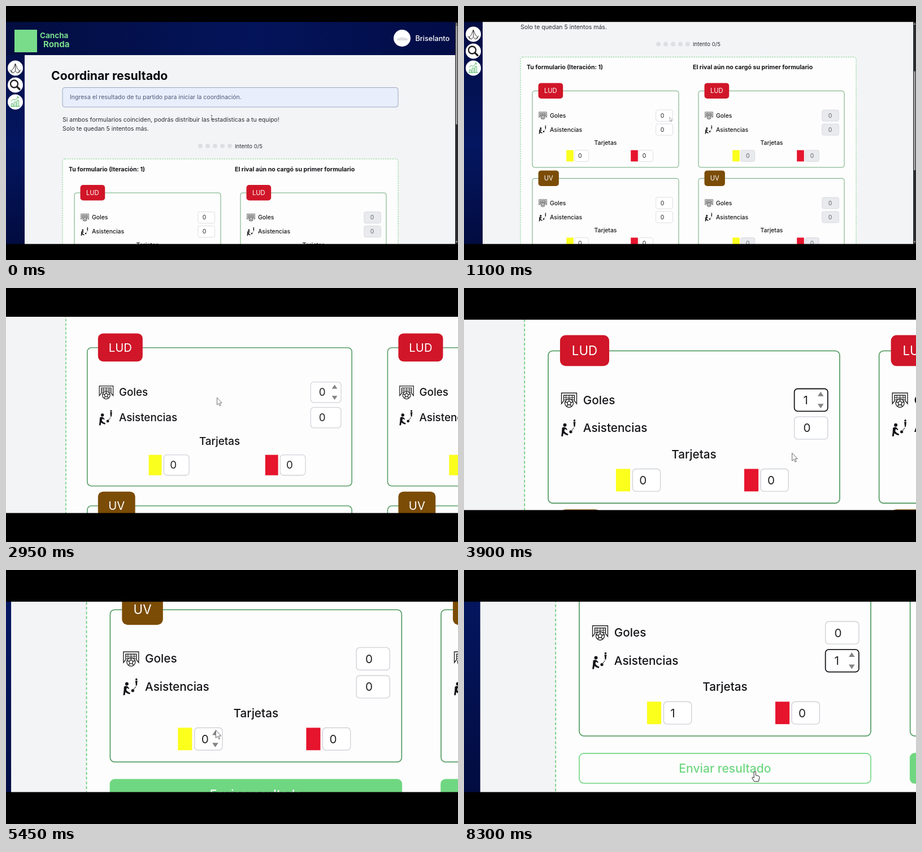
Animation of 800 by 450 pixels, one loop 8.35 s. Source, as an HTML page:

```html
<!DOCTYPE html>
<html lang="es">
<head>
<meta charset="utf-8">
<title>Coordinar resultado</title>
<style>
html, body { margin: 0; width: 100%; height: 100%; overflow: hidden; background: #000; }
svg { display: block; width: 100%; height: 100%; font: 500 10.4px Inter, sans-serif; fill: #141418; }
.bold { font-weight: 700; }
.plain { font-weight: 400; fill: #2b2d33; }
.mid { text-anchor: middle; }
.line { fill: none; stroke: #222; }
</style>
</head>
<body>
<svg viewBox="0 0 800 450">
  <defs>
    <linearGradient id="head">
      <stop offset="0" stop-color="#020d40"/><stop offset=".55" stop-color="#04145a"/><stop offset="1" stop-color="#020c46"/>
    </linearGradient>
    <linearGradient id="side" x2="0" y2="1">
      <stop offset="0" stop-color="#020d42"/><stop offset=".55" stop-color="#041660"/><stop offset="1" stop-color="#020c40"/>
    </linearGradient>
    <g id="goal" class="line" stroke-width="1.4">
      <path d="M1 20V1H28V20L24 15V5H5V15Z"/>
      <path d="M5 9H24M5 13H24M9 5V15M14.5 5V11M20 5V15" stroke-width="1"/>
      <circle cx="14.5" cy="19" r="7.5" fill="#fdfdfd"/>
      <path d="M14.5 15L18 18 16.7 22H12.3L11 18ZM14.5 15V11.5M18 18L21.5 16.5M16.7 22L19 25M12.3 22L10 25M11 18L7.5 16.5"/>
    </g>
    <g id="assist">
      <circle cx="7" cy="10" r="3"/><circle cx="17.5" cy="22" r="2.6"/><circle cx="24" cy="2" r="1.8"/>
      <path d="M2 15L5 13.5 8.500 14.500 11.500 18 10.500 19 7 17 6 21 9 24 13 26 12 28.500 7 26.500 4.500 24.500 3.500 30H.5L1.500 23Z"/>
      <path d="M22 4.500H26L25.500 8 25 13H23L22.500 8Z"/>
      <path class="line" d="M19.500 19.500L23.500 14" stroke-width="1.3" stroke-dasharray="2 1"/>
    </g>
  </defs>
  <g id="cam">
    <rect y="28" width="800" height="394" fill="#f3f4f6"/>
    <rect y="28" width="33" height="394" fill="url(#side)"/>
    <g id="page"></g>
    <g id="menu">
      <circle cx="16.500" cy="110" r="13.500" fill="#fff"/>
      <circle cx="16.500" cy="140" r="13.500" fill="#fff"/>
      <circle cx="16.500" cy="170" r="13.500" fill="#fff"/>
      <path class="line" stroke-width=".9" d="M16.500 102L13 111 9 115 13 119 16.500 115 20 119 24 115 20 111ZM16.500 102V115M7 113L11 119M26 113L22 119"/>
      <g class="line" stroke="#111"><circle cx="14.500" cy="138" r="6.500" stroke-width="2.300"/><path d="M19.500 143L25 148.500" stroke-width="3.200"/></g>
      <path fill="none" stroke="#55b56a" d="M8 178H25M9.500 178V173H12.500V178M14.500 178V170H17.500V178M19.500 178V167H22.500V178M9 169L13 165 16 167 22 161M19 161H22V164"/>
    </g>
    <rect x="795" y="28" width="5" height="394" fill="#2b2c2f"/>
    <path d="M795.800 33L797.500 30 799.200 33ZM795.800 416.500L797.500 419.500 799.200 416.500Z" fill="#aaa"/>
    <rect id="thumb" x="796" y="34" width="3" height="176" rx="1.500" fill="#9c9c9c"/>
    <g id="cursor">
      <path id="arrow" d="M0 0V7L1.600 5.600 2.700 8 3.700 7.600 2.600 5.200H4.800Z" fill="#fff" stroke="#555" stroke-width=".45"/>
      <path id="beam" class="line" d="M-1.300 -3.300H1.300M0 -3.300V3.300M-1.300 3.300H1.300" stroke-width=".6"/>
      <path id="hand" d="M-.8 .5Q0 -.6 .8 .5V3.500L3.600 4.200Q4.300 4.500 4.100 5.500L3.300 9H-.6L-2.500 5.800Q-2.300 4.600 -.8 5.800Z" fill="#fff" stroke="#222" stroke-width=".5"/>
    </g>
  </g>
  <rect id="top" width="800" fill="#000"/>
  <rect id="bottom" width="800" fill="#000"/>
</svg>
<script>
const LOOP = 8350, GREEN = '#6fd781';
const $ = id => document.getElementById(id);
const set = (id, attrs) => { for (const k in attrs) $(id).setAttribute(k, attrs[k]); };
const show = (id, on) => set(id, {visibility: on ? 'visible' : 'hidden'});

const text = (x, y, s, attrs = '') => `<text x="${x}" y="${y}" ${attrs}>${s}</text>`;
const rect = (x, y, w, h, r, fill, attrs = '') =>
  `<rect x="${x}" y="${y}" width="${w}" height="${h}" rx="${r}" fill="${fill}" ${attrs}/>`;

function input(id, x, y, w, rival) {
  const inset = (w > 27 ? 8 : 6) + (rival ? 3 : 0);
  return rect(x, y, w, 20, 3, rival ? '#e9eaee' : '#fff', `id="${id}" stroke="#d0d2d8" stroke-width=".7"`) +
    text(x + inset, y + 13.7, 0, `id="${id}v" font-weight="400" fill="${rival ? '#62646b' : '#222'}"`) +
    `<path id="${id}s" visibility="hidden" fill="#858585"
      transform="translate(${x + w - 6.3} ${y + 10})" d="M-2.7 -3.400L0 -7.400 2.700 -3.400ZM-2.700 3.400L0 7.400 2.700 3.400Z"/>`;
}

function team(side, row, name, color, badge) {
  const dx = side * 294, y = 331 + row * 155, key = 'ab'[side] + row;
  return rect(121 + dx, y, 259 - side, 135.5, 4, '#fdfdfd', 'stroke="#5ba069" stroke-width=".9"') +
    rect(131.5 + dx, y - 14, badge, 27.5, 5, color) +
    text(131.5 + dx + badge / 2, y + 4, name, 'class="mid" font-size="11.2" font-weight="400" fill="#fff"') +
    `<use href="#goal" transform="translate(${132.3 + dx} ${y + 37}) scale(.5)"/>` +
    `<use href="#assist" transform="translate(${132.3 + dx} ${y + 61}) scale(.5)"/>` +
    text(152 + dx, y + 47.3, 'Goles') + text(152 + dx, y + 72.3, 'Asistencias') +
    text(250.5 + dx, y + 95.5, 'Tarjetas', 'class="mid"') +
    input(key + 'g', 339.7 + dx, y + 33.7, 29.7, side) +
    input(key + 'a', 339.7 + dx, y + 58.6, 29.7, side) +
    rect(181.2 + dx, y + 105, 12.6, 20, 0, '#fbff1c') + input(key + 'y', 196 + dx, y + 105, 24.7, side) +
    rect(295.2 + dx, y + 105, 12.6, 20, 0, '#e6142d') + input(key + 'r', 309.8 + dx, y + 105, 24.7, side);
}

const button = (id, x, w, label) => rect(x, 637, w, 26.5, 4, GREEN, `id="${id}" stroke="${GREEN}" stroke-width=".8"`) +
  text(x + w / 2, 654, label, `id="${id}Label" class="mid" font-size="10.6" fill="#fff"`);

let html = rect(0, 28, 800, 59, 0, 'url(#head)') +
  rect(15, 42, 40, 40, 0, '#79dc8b') +
  text(60, 57, 'Cancha', `class="bold" font-size="13.500" fill="#79dc8b"`) +
  text(66, 72.5, 'Ronda', `class="bold" font-size="15" fill="#79dc8b"`) +
  '<circle cx="701" cy="57" r="15" fill="#fff"/><path d="M692 58Q701 53 711 58V61H692Z" fill="#dedfe2"/>' +
  text(724.5, 61.5, 'Briselanto', 'font-size="12.700" fill="#fff"') +
  text(80, 130.5, 'Coordinar resultado', 'class="bold" font-size="21.200" fill="#08080c"') +
  rect(100, 144.5, 594, 34.5, 4, '#e8eefb', 'stroke="#8794b0" stroke-width=".8"') +
  text(113, 165.3, 'Ingresa el resultado de tu partido para iniciar la coordinación.', 'font-size="10.500" font-weight="400" fill="#50597a"') +
  text(100, 205.2, 'Si ambos formularios coinciden, podrás distribuir las estadísticas a tu equipo!', 'class="plain" font-size="10.500"') +
  text(100, 221.2, 'Solo te quedan 5 intentos más.', 'class="plain" font-size="10.500"') +
  text(405, 251.5, 'Intento 0/5', 'class="plain" font-size="9.500"') +
  rect(100, 271, 594, 440, 4, '#fdfdfd', 'stroke="#6fcf80" stroke-width=".9" stroke-dasharray="2.500 1.700"') +
  text(111, 292.6, 'Tu formulario (Iteración: 1)', 'class="bold" font-size="10.500"') +
  text(405, 292.6, 'El rival aún no cargó su primer formulario', 'class="bold" font-size="10.600"');
for (let i = 0; i < 5; i++) html += `<circle cx="${344 + i * 13}" cy="248" r="4" fill="#dddfe3"/>`;
for (const side of [0, 1])
  html += team(side, 0, 'LUD', '#d01628', 43.7) + team(side, 1, 'UV', '#7b4c05', 36.4);
$('page').innerHTML = html + button('send', 121, 259, 'Enviar resultado') + button('chat', 415, 258, 'Abrir Mensarvo');

const ease = u => { u = Math.min(1, Math.max(0, u)); return u * u * (3 - 2 * u); };
const span = (t, a, b) => ease((t - a) / (b - a));

// Eased value of [time, value...] keys
function track(keys, t) {
  let i = 0;
  while (i < keys.length - 2 && t >= keys[i + 1][0]) i++;
  const [a, b] = [keys[i], keys[i + 1]], p = span(t, a[0], b[0]);
  return a.slice(1).map((v, k) => v + (b[k + 1] - v) * p);
}

const pointer = [[1900, 364, 197], [2950, 248, 130], [3300, 363, 119], [3600, 363, 119], [4050, 329, 190],
  [4450, 329, 190], [4950, 251.5, 259.5], [5500, 214, 345], [5850, 214, 345], [6350, 348, 303.7],
  [6550, 348, 303.7], [6850, 362, 300], [7300, 362, 300], [8050, 277, 403]];
const panX = [[4300, -92], [4950, -107], [5720, -37]];

// id, hover start, click time, focus end, hover end
const fields = [['a0g', 2850, 3400, 4150, 3800], ['a0r', 3950, 4150, 5600, 4600],
  ['a1y', 5400, 5600, 6950, 6000], ['a1a', 6250, 6950, LOOP, 7500]];

function draw(t) {
  const scroll = 250 * span(t, 350, 1500), p = span(t, 2400, 3160), s = 1 + .992 * p;
  const camX = p * track(panX, t)[0], camY = p * (-50 - 396 * span(t, 4456, 5720));
  set('cam', {transform: `translate(${camX} ${camY}) scale(${s})`});
  set('page', {transform: `translate(0 ${-scroll})`});
  set('menu', {transform: `translate(0 ${-Math.min(scroll, 60)})`});
  set('thumb', {y: 34 + scroll * .45});
  set('top', {height: 28.2 * s});
  set('bottom', {y: 450 - 28.4 * s, height: 28.4 * s});

  for (const [id, enter, click, blur, leave] of fields) {
    const focus = t >= click && t < blur;
    set(id, {stroke: focus ? '#17171c' : '#d0d2d8', 'stroke-width': focus ? .9 : .7});
    show(id + 's', focus || t >= enter && t < leave);
    $(id + 'v').textContent = t >= click ? 1 : 0;
  }
  // The last field loses its arrows only when the loop restarts

  const [x, y] = track(pointer, t), hover = y > 387;
  set('send', {fill: hover ? '#fdfdfd' : GREEN});
  set('sendLabel', {fill: hover ? GREEN : '#fff'});
  const beam = t < 400 || t > 6250 && t < 6700;
  set('cursor', {transform: `translate(${x} ${y})`});
  show('beam', beam);
  show('hand', hover);
  show('arrow', !beam && !hover);
}

const start = performance.now();
function frame() {
  draw((performance.now() - start) % LOOP);
  requestAnimationFrame(frame);
}
frame();
</script>
</body>
</html>
```
